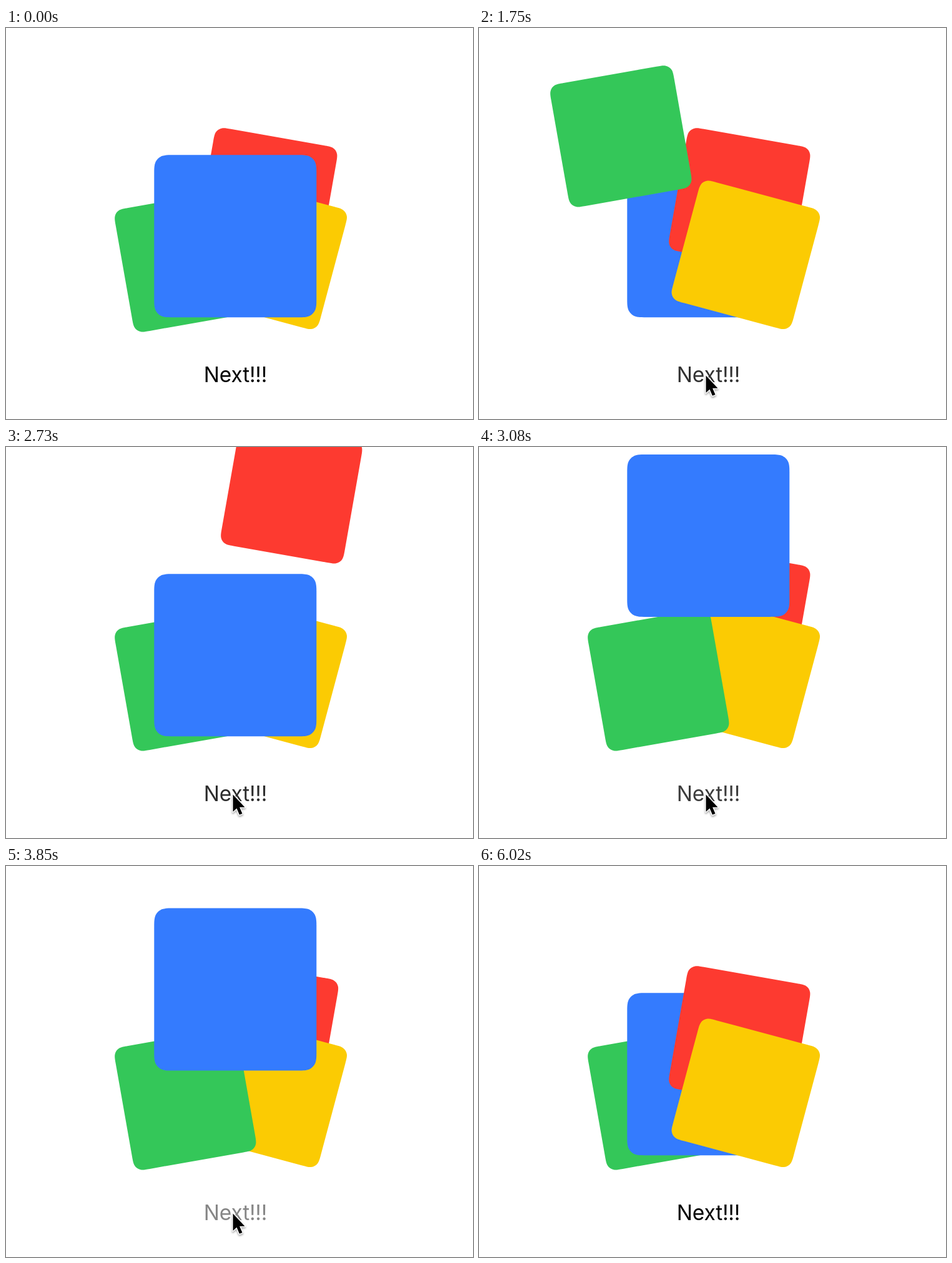
Write an HTML page that moves like this. It is 748x626 px and loops after 6440 ms.

```html
<!DOCTYPE html>
<html lang="en">
<head>
<meta charset="utf-8">
<title>Card stack</title>
<style>
html, body { margin: 0; width: 100%; height: 100%; overflow: hidden; background: #fff; }
svg { display: block; width: 748px; height: 626px; }
text { font: 400 33.5px Inter, "Open Sans", sans-serif; letter-spacing: -0.2px; text-anchor: middle; }
#cursor { filter: drop-shadow(0 2px 1.5px rgba(0, 0, 0, .35)); }
</style>
</head>
<body>
<svg viewBox="0 0 748 626">
  <g id="stack"></g>
  <text id="label" x="367.5" y="566.5">Next!!!</text>
  <path id="cursor" d="M363.5 556.5v27.5l6-5.6 4.4 10.4 4.6-1.9-4.4-10.1h8.4z"
    fill="#000" stroke="#fff" stroke-width="3" stroke-linejoin="round" paint-order="stroke"/>
</svg>
<script>
const LOOP = 6440, STEP = 70;
const MOVE = 150, HOLD = 30, PRESS = 50;
const CENTER = [367.3, 333.3];
const CURSOR = [420, 4900];

// Bottom to top; home is the offset from the centre, lift the offset at the peak.
const cards = [
  { name: 'red', color: '#fd3a30', size: 200, angle: 10, home: [50, -60], lift: [40, -200] },
  { name: 'yellow', color: '#fbcb03', size: 200, angle: 15, home: [60, 30], lift: [60, -200] },
  { name: 'green', color: '#34c759', size: 200, angle: -10, home: [-80, 40], lift: [-60, -200] },
  { name: 'blue', color: '#347bfe', size: 260, angle: 0, home: [0, 0], lift: [0, -200] }
];

// Each click sends the top card to the bottom of the stack.
const clicks = [938, 1600, 2185, 2570, 2952, 3170, 3372, 3542, 3759, 3960];

// Label opacity by time since the latest click.
const fade = [[0, .2], [30, .2], [55, .25], [91, .47], [128, .76], [182, .87], [240, 1]];

const stack = document.getElementById('stack');
const label = document.getElementById('label');
const cursor = document.getElementById('cursor');

// Square with continuous corners, centred on the origin.
function squarePath(size) {
  const h = size / 2, r = size * .08;
  const corner = [
    [0, 1.52866], [0, 1.08849], [0, .8684], [.07491, .63149],
    [.16906, .37282], [.37282, .16906], [.63149, .07491],
    [.8684, 0], [1.08849, 0], [1.52866, 0]
  ];
  let d = '';
  for (let q = 0; q < 4; q++) {
    const pts = corner.map(([a, b]) => {
      let x = a * r - h, y = b * r - h;
      for (let i = 0; i < q; i++) [x, y] = [-y, x];
      return x.toFixed(2) + ' ' + y.toFixed(2);
    });
    d += (q ? 'L' : 'M') + pts[0] + 'C' + pts.slice(1).join(' ');
  }
  return d + 'Z';
}

for (const card of cards) {
  card.el = document.createElementNS('http://www.w3.org/2000/svg', 'path');
  card.el.setAttribute('d', squarePath(card.size));
  card.el.setAttribute('fill', card.color);
}

const clamp = x => Math.min(1, Math.max(0, x));

// Cubic ease-in-out with handles at .42 and .58.
function ease(x) {
  x = clamp(x);
  let lo = 0, hi = 1;
  for (let i = 0; i < 24; i++) {
    const u = (lo + hi) / 2, v = 1 - u;
    if (3 * v * v * u * .42 + 3 * v * u * u * .58 + u * u * u < x) lo = u;
    else hi = u;
  }
  return lo * lo * (3 - 2 * lo);
}

function lifted(age) {
  return age < MOVE + HOLD ? ease(age / MOVE) : 1 - ease((age - MOVE - HOLD) / MOVE);
}

function labelOpacity(t) {
  if (clicks.some(c => t >= c - PRESS && t < c)) return .2;
  const last = clicks.filter(c => c <= t).pop();
  if (last === undefined) return 1;
  const age = t - last;
  const i = fade.findIndex(k => k[0] > age);
  if (i < 0) return 1;
  const [t0, a] = fade[i - 1], [t1, b] = fade[i];
  return a + (b - a) * (age - t0) / (t1 - t0);
}

function draw(t) {
  const order = cards.slice();
  const raise = new Map();
  clicks.forEach((start, i) => {
    const card = cards[3 - i % 4], age = t - start;
    if (age > 0 && age < 2 * MOVE + HOLD) raise.set(card, lifted(age));
    if (age >= MOVE + HOLD) order.unshift(order.pop());
  });
  for (const card of order) {
    const k = raise.get(card) || 0;
    const [x, y] = [0, 1].map(i => CENTER[i] + card.home[i] + card.lift[i] * k);
    card.el.setAttribute('transform', `translate(${x} ${y}) rotate(${card.angle})`);
  }
  stack.replaceChildren(...order.map(card => card.el));
  label.setAttribute('opacity', labelOpacity(t));
  cursor.style.visibility = t >= CURSOR[0] && t < CURSOR[1] ? 'visible' : 'hidden';
}

const origin = performance.now();
let shown = -1;
function tick() {
  const t = Math.floor(((performance.now() - origin) % LOOP) / STEP) * STEP;
  if (t !== shown) draw(shown = t);
  requestAnimationFrame(tick);
}
tick();
</script>
</body>
</html>
```
